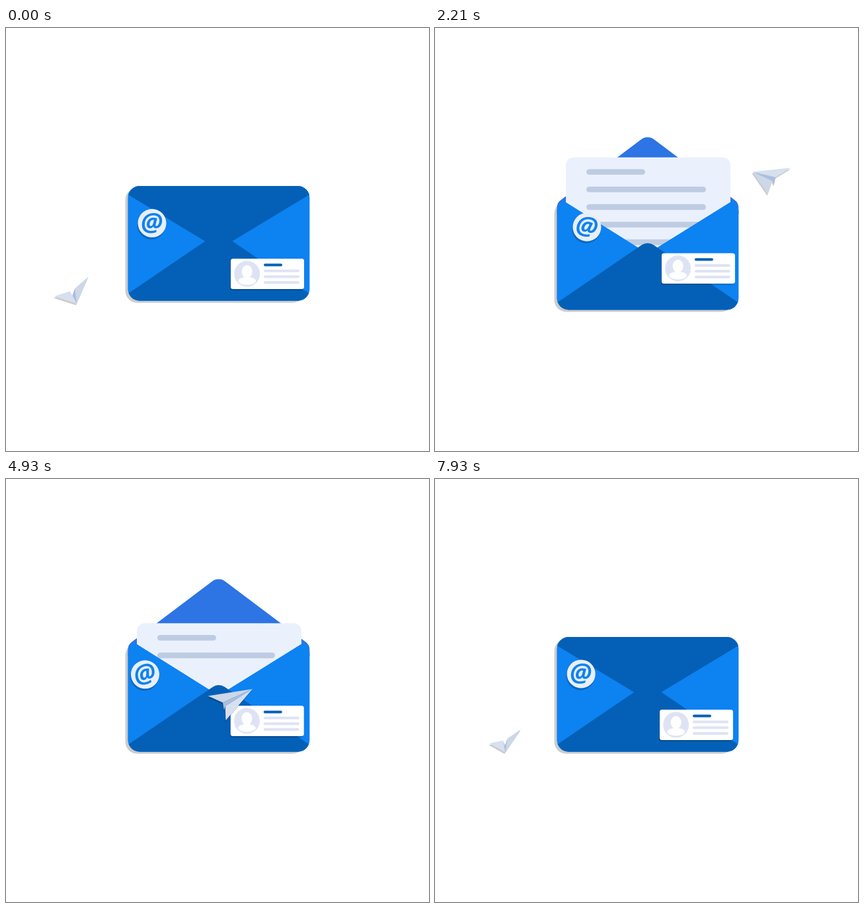
An HTML page with a canvas for the animation above (8000 ms loop, 640x640 px).

```html
<!DOCTYPE html>
<html lang="en">
<head>
<meta charset="utf-8">
<title>Envelope and paper plane</title>
<style>
html, body { margin: 0; width: 100%; height: 100%; overflow: hidden; background: #fff; }
canvas { display: block; }
</style>
</head>
<body>
<canvas id="stage" width="640" height="640"></canvas>
<script>
const ctx = document.getElementById('stage').getContext('2d');
const LOOP = 8000, CYCLE = 4000;
const DARK = '#0460b6', BLUE = '#0d82f1', INSIDE = '#2d74e4', SHADE = 'rgba(0,0,0,.2)', MIST = '#dee3f4';
const MID = 321.7, LEFT = 184.5, RIGHT = 459.3, BOTTOM = 412.7, CORNER = 18;

// Key points: time, x, y
const badgeKeys = [
  [0, 221, 295.3], [1210, 230.5, 299.4], [3140, 226.6, 301.3], [4210, 218, 295],
  [5150, 210, 296], [5790, 222, 294.2], [6860, 230.6, 287.2]
];
const cardKeys = [
  [0, 340, 349], [1210, 341.2, 344], [3140, 343.2, 339.2],
  [4210, 336.3, 344], [5790, 344.5, 341], [6860, 339.6, 342]
];
// Key poses: time, nose, then left and right wing tip relative to the nose
const planeKeys = [
  [0, 107, 417, 18, -41, -34, -11],
  [210, 142, 408, -18, -32, -69, 8],
  [1210, 450, 284, -76, 24, -23, 53],
  [1790, 517, 230, -42, 33, 32, 7],
  [2150, 495, 212, 20, 34, 58, -5],
  [3430, 136, 372, 49, 23, 40, -22]
];

const mix = (a, b, k) => a + (b - a) * k;

function ramp(t, from, to) {
  const u = Math.min(1, Math.max(0, (t - from) / (to - from)));
  return u * u * (3 - 2 * u);
}

// Smooth periodic curve through the keys
function spline(keys, t, period) {
  const n = keys.length;
  const key = i => {
    const turn = Math.floor(i / n), k = keys[i - turn * n];
    return [k[0] + turn * period, ...k.slice(1)];
  };
  let i = n - 1;
  while (keys[i][0] > t) i--;
  const [a, b, c, d] = [key(i - 1), key(i), key(i + 1), key(i + 2)];
  const h = c[0] - b[0], u = (t - b[0]) / h, v = 1 - u;
  return b.slice(1).map((p, j) => {
    const q = c[j + 1];
    const m0 = (q - a[j + 1]) / (c[0] - a[0]) * h;
    const m1 = (d[j + 1] - p) / (d[0] - b[0]) * h;
    return p * v * v * (1 + 2 * u) + q * u * u * (3 - 2 * u) + m0 * u * v * v - m1 * u * u * v;
  });
}

function fill(color, trace) {
  ctx.beginPath();
  trace();
  ctx.fillStyle = color;
  ctx.fill();
}

const box = (color, x, y, w, h, r) => fill(color, () => ctx.roundRect(x, y, w, h, r));
const oval = (color, x, y, rx, ry = rx) => fill(color, () => ctx.ellipse(x, y, rx, ry, 0, 0, 7));
const bar = (color, x0, x1, y, h) => box(color, x0, y - h / 2, x1 - x0, h, h / 2);

function poly(points) {
  points.forEach(([x, y], i) => i ? ctx.lineTo(x, y) : ctx.moveTo(x, y));
  ctx.closePath();
}

// Triangle with a rounded tip and shoulders, closed along baseY
function peak(color, edgeY, tipY, baseY, shoulder) {
  fill(color, () => {
    ctx.moveTo(LEFT, baseY);
    ctx.arcTo(LEFT, edgeY, MID, tipY, shoulder);
    ctx.arcTo(MID, tipY, RIGHT, edgeY, 16);
    ctx.arcTo(RIGHT, edgeY, RIGHT, baseY, shoulder);
    ctx.lineTo(RIGHT, baseY);
  });
}

// The lines are written one after another
function letter(top, u) {
  box('#eaf1fc', 198, top, 249, 152, 12);
  for (let i = 0; i < 5; i++) {
    const begin = 450 + i * 250;
    const end = mix(229, i ? 410 : 318, ramp(u, begin, begin + 250));
    if (end > 237) bar('#becce3', 229, end, top + 22 + i * 26.6, 8.6);
  }
}

function envelope(u) {
  const open = ramp(u, 220, 700) - ramp(u, 3330, 3830);
  const out = ramp(u, 650, 1200) - ramp(u, 2860, 3310);
  const top = mix(239, 246, open);
  const tip = mix(335, 147.6, open);
  const lifted = tip < 250;
  const height = BOTTOM - top;

  box(SHADE, LEFT - 4, top + 3, RIGHT - LEFT - 4, height, CORNER);
  box(INSIDE, LEFT, top, RIGHT - LEFT, height, CORNER);
  if (lifted) peak(INSIDE, 251, tip, 268, 14);
  letter(182 + 75 * (1 - out), u);

  ctx.save();
  ctx.beginPath();
  ctx.roundRect(LEFT, top, RIGHT - LEFT, height, CORNER);
  ctx.clip();
  fill(BLUE, () => poly([[LEFT, 241.5], [MID, 327.5], [RIGHT, 242], [RIGHT, BOTTOM], [LEFT, BOTTOM]]));
  peak(DARK, 402, 308.5, BOTTOM, 0);
  if (!lifted) peak(DARK, 252, tip, 238, 0);
  ctx.restore();
}

function badge([x, y]) {
  oval(SHADE, x - 1, y + 3, 21.5);
  oval('#e9eff9', x, y, 21.5);
  ctx.save();
  ctx.translate(x, y);
  ctx.rotate((x - 221) * 1.3 * Math.PI / 180);
  ctx.font = 'italic 700 38px "Open Sans", "Noto Sans", sans-serif';
  ctx.fillStyle = BLUE;
  const m = ctx.measureText('@');
  ctx.fillText('@',
    (m.actualBoundingBoxLeft - m.actualBoundingBoxRight) / 2,
    (m.actualBoundingBoxAscent - m.actualBoundingBoxDescent) / 2);
  ctx.restore();
}

function card([x, y]) {
  ctx.save();
  ctx.translate(x, y);
  box(SHADE, -1, 2, 111, 46, 4);
  box('#fff', 0, 0, 111, 46, 3.5);
  oval(MIST, 24.7, 23, 19.5);
  oval('#fff', 24.7, 19.5, 8, 9.8);
  box('#fff', 21, 25, 7.4, 6, 0);
  oval('#fff', 24.7, 33.7, 13.3, 6);
  bar(DARK, 50, 78, 9.6, 4);
  for (let i = 0; i < 3; i++) bar(MIST, 50, 104, 18.6 + i * 8.7, 4);
  ctx.restore();
}

// The folds and the keel follow from the nose and the wing tips
function plane([x, y, lx, ly, rx, ry]) {
  const at = (l, r, drop = 0) => [x + lx * l + rx * r, y + ly * l + ry * r + drop];
  const nose = at(0, 0), lFold = at(.47, .33), rFold = at(.33, .47), keel = at(.4, .4, 9);
  const parts = [
    ['#ccd7e8', [nose, at(1, 0), lFold]],
    ['#a9bfde', [nose, lFold, keel, rFold]],
    ['#d6e0ef', [nose, rFold, at(0, 1)]]
  ];
  ctx.save();
  ctx.translate(-1, 2.5);
  fill(SHADE, () => parts.forEach(([, points]) => poly(points)));
  ctx.restore();
  for (const [color, points] of parts) fill(color, () => poly(points));
}

function draw(now) {
  const t = now % LOOP, u = t % CYCLE;
  const bob = t < CYCLE ? 7.05 * (1 - Math.cos(2 * Math.PI * t / CYCLE)) : 0;
  const flight = spline(planeKeys, u, CYCLE);
  const behind = u > 2000 && u < 3700;

  ctx.fillStyle = '#fff';
  ctx.fillRect(0, 0, 640, 640);
  if (behind) plane(flight);
  ctx.save();
  ctx.translate(0, bob);
  envelope(u);
  ctx.restore();
  badge(spline(badgeKeys, t, LOOP));
  card(spline(cardKeys, t, LOOP));
  if (!behind) plane(flight);
}

const start = performance.now();
function tick() {
  draw(performance.now() - start);
  requestAnimationFrame(tick);
}
tick();
</script>
</body>
</html>
```
